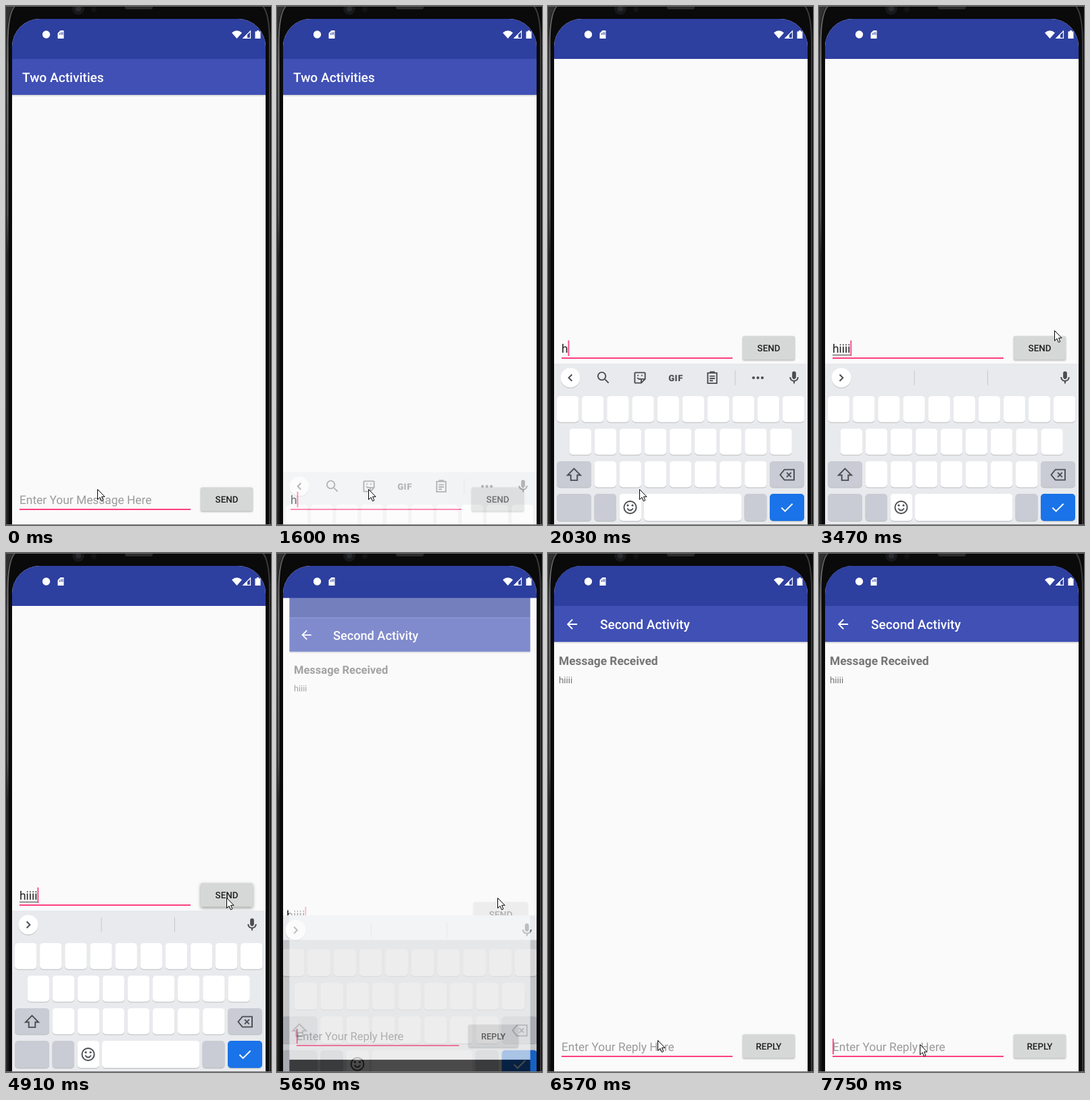
An HTML page for the animation above (8000 ms loop, 392 px wide and 765 px high).

```html
<!DOCTYPE html>
<html lang="en">
<head>
<meta charset="utf-8">
<title>Two Activities</title>
<style>
  html, body { margin: 0; width: 100%; height: 100%; overflow: hidden; background: #0a0a0b; }
  svg { display: block; font-family: Roboto, sans-serif; text-rendering: geometricPrecision; }
  .title { font-size: 19.1px; font-weight: 500; fill: #fff; }
  .field { font-size: 17.35px; fill: #212121; }
  .hint { fill: #9b9b9b; }
  .label { font-size: 13.37px; font-weight: 500; fill: #1f1f1f; text-anchor: middle; }
  .button { fill: #d6d7d7; filter: drop-shadow(0 1px 1px rgba(0,0,0,.32)); }
  .button.raised { filter: drop-shadow(0 2px 2.5px rgba(0,0,0,.38)); }
  .button.rippling { fill: #cbcccc; }
  .bar { fill: #4050b5; }
  .status { fill: #2d3f9f; }
  .paper { fill: #fafafa; }
  .pink { fill: #ff4081; }
  .key { filter: drop-shadow(0 1px 0 rgba(0,0,0,.2)); }
  .line { fill: none; stroke: #4a4d51; stroke-width: 2; }
  .solid { fill: #4a4d51; }
</style>
</head>
<body>
<svg width="392" height="765" viewBox="0 0 392 765">
  <defs>
    <clipPath id="screen"><path d="M9 764V60A41 41 0 0 1 50 19H343A41 41 0 0 1 384 60V764Z"/></clipPath>
    <linearGradient id="edge" x2="0" y2="1">
      <stop stop-color="#555"/><stop offset=".12" stop-color="#8a8a8a"/>
      <stop offset=".4" stop-color="#666"/><stop offset=".48" stop-color="#2c2c2c"/><stop offset="1" stop-color="#242424"/>
    </linearGradient>
  </defs>

  <rect width="392" height="765" fill="#0a0a0b"/>
  <path d="M1 765V55Q1 12 11 0H0V765Z" fill="#303030"/>
  <path d="M2.5 765V56Q2.5 12 13 0" fill="none" stroke="url(#edge)" stroke-width="2"/>
  <path d="M390 765V55Q390 12 380 0" fill="none" stroke="#3a3a3a" stroke-width="2"/>
  <circle cx="107" cy="4" r="9" fill="#17181a"/><circle cx="107" cy="4" r="4" fill="#292b2e"/>
  <circle cx="130" cy="5" r="4" fill="#131314"/>
  <rect x="176" y="-3" width="41" height="8" rx="3" fill="#2a2a2b"/>
  <path d="M0 .5H392" stroke="#6c6c6c"/>

  <g clip-path="url(#screen)">
    <g id="first">
      <rect class="paper" x="9" y="19" width="375" height="760"/>
      <g id="firstContent"></g>
      <rect class="status" x="9" y="0" width="375" height="78"/>
      <g id="keyboard"></g>
    </g>
    <g id="second">
      <rect class="paper" x="9" y="131" width="375" height="633"/>
      <rect class="status" x="9" y="19" width="375" height="59"/>
      <rect x="9" y="764" width="375" height="40"/>
      <g id="secondContent"></g>
    </g>
    <g fill="#fff">
      <circle cx="59.5" cy="42" r="5.7"/>
      <path d="M80.500 36H85.500V48H76.500V40Z"/>
      <path d="M79.500 40v2.500M81.700 38.500v4M83.800 38.500v4" stroke="#2d3f9f"/>
      <path d="M341.500 48L334 39.500Q341.500 33 349 39.500Z"/>
      <path d="M361.500 37V47.400H351Z" fill="none" stroke="#fff" stroke-width="1.200"/>
      <path d="M357 41V48H350Z"/>
      <path d="M368.500 37.500H371V36H374V37.500H376.500V48H368.500Z"/>
    </g>
  </g>
  <path d="M0 764.500H392" stroke="#777"/>
  <path id="mouse" d="M.5 .5V15.500L4 12.300L6.400 17.800L8.800 16.700L6.500 11.300H11Z" fill="#fff" stroke="#000"/>
</svg>

<script>
const $ = id => document.getElementById(id);

const rect = (x, y, w, h, extra = '') => `<rect x="${x}" y="${y}" width="${w}" height="${h}" ${extra}/>`;
const text = (x, y, cls, str, extra = '') => `<text x="${x}" y="${y}" class="${cls}" ${extra}>${str}</text>`;
// Icons are drawn on a 24-unit grid and centred on (cx, cy).
const icon = (cx, cy, d, cls = 'line', extra = '') =>
  `<path transform="translate(${cx} ${cy}) scale(.955) translate(-12 -12)" d="${d}" class="${cls}" ${extra}/>`;

const page = (id, title, titleX, label, hint) =>
  rect(9, 78, 375, 53, 'class="bar"') + rect(9, 131, 375, 2, 'opacity=".12"') +
  text(titleX, 112, 'title', title) +
  text(20, 734, 'field hint', hint, `id="${id}Hint"`) +
  rect(20, 741, 253, 2, 'class="pink"') +
  rect(20, 716, 1.8, 23, `class="pink" id="${id}Caret"`) +
  rect(288, 709.5, 77, 35, `rx="2" class="button" id="${id}Button"`) +
  text(326.5, 732, 'label', label);

$('firstContent').innerHTML = page('first', 'Two Activities', 24, 'SEND', 'Enter Your Message Here') +
  text(20, 734, 'field', '', 'id="typed"') + rect(20, 737, 0, 1, 'id="composing" fill="#444"');

$('secondContent').innerHTML = page('second', 'Second Activity', 77, 'REPLY', 'Enter Your Reply Here') +
  icon(35.5, 105, 'M20 11H7.830l5.590-5.590L12 4l-8 8 8 8 1.410-1.410L7.830 13H20z', '', 'fill="#fff"') +
  text(16, 165.3, '', 'Message Received', 'font-size="17.35" font-weight="700" fill="#757575"') +
  text(16, 192, '', 'hiiii', 'font-size="13.37" fill="#757575"');

function keyboardMarkup() {
  const grey = '#c9ccd4';
  const key = (x, y, w, fill = '#fff') => rect(x, y, w, y > 700 ? 40 : 38.5, `rx="5" fill="${fill}" class="key"`);
  const row = (x, y, count) => Array.from({ length: count }, (_, i) => key(x + i * 37.1, y, 32.5)).join('');
  const divider = x => rect(x, 537, 1, 22, 'fill="#c6c9cd"');
  const dots = [304, 310.5, 317].map(x => `<circle cx="${x}" cy="548" r="2.1" class="solid"/>`).join('');
  const tools =
    icon(33, 548, 'M14.500 7L9.500 12L14.500 17') +
    icon(82, 548, 'M14.500 14.500L20 20M15.500 9.500A6 6 0 1 1 3.500 9.500A6 6 0 1 1 15.500 9.500Z', 'line', 'stroke-width="2.2"') +
    icon(136, 548, 'M5 4H19Q20 4 20 5V14L14 20H5Q4 20 4 19V5Q4 4 5 4ZM14 20V14H20M8 8.500H10M14 8.500H16M8 12Q10 15 13 13.500') +
    text(189, 552.5, 'solid', 'GIF', 'font-size="13" font-weight="900" text-anchor="middle" letter-spacing=".6"') +
    icon(243, 548, 'M5 4.500H19V20.500H5ZM8 9.500H16M8 13H16M8 16.500H13M9 4.500H15V3H9Z') +
    divider(276.5) + dots;
  const suggestions = icon(33, 548, 'M9.500 7L14.500 12L9.500 17') + divider(140.5) + divider(249);

  return rect(0, 527, 392, 260, 'fill="#e8eaed"') +
    '<circle cx="33" cy="548" r="14.5" fill="#fff" class="key"/>' +
    `<g id="tools">${tools}</g><g id="suggestions">${suggestions}</g>` +
    icon(364, 548, 'M12 14c1.660 0 3-1.340 3-3V5a3 3 0 0 0-6 0v6c0 1.660 1.340 3 3 3zm5-3a5 5 0 0 1-10 0H5c0 3.530 2.610 6.430 6 6.920V21h2v-3.080c3.390-.490 6-3.390 6-6.920z', 'solid') +
    row(13, 575, 10) + row(31.5, 623, 9) + row(68.5, 671, 7) +
    key(13, 671, 51, grey) + key(328, 671, 51, grey) +
    key(13, 719, 51, grey) + key(68.5, 719, 32.5, grey) + key(105.5, 719, 32.5) +
    key(142, 719, 144.5) + key(290.5, 719, 33, grey) + key(328, 719, 51, '#1a73e8') +
    icon(38.5, 691, 'M12 2.500L22 12.500H17V20.500H7V12.500H2Z') +
    icon(353.5, 691, 'M8 4H23V20H8L1.500 12ZM11.500 8.500L18.500 15.500M18.500 8.500L11.500 15.500') +
    icon(121.5, 739, 'M21.500 12A9.500 9.500 0 1 1 2.500 12A9.500 9.500 0 1 1 21.500 12ZM7.500 13.500Q12 20 16.500 13.500') +
    '<circle cx="118" cy="736" r="1.6" class="solid"/><circle cx="125" cy="736" r="1.6" class="solid"/>' +
    icon(353.5, 739, 'M3.500 12.500L9 18L20.500 6.500', 'line', 'style="stroke:#fff"') +
    rect(0, 562, 392, 225, 'id="shade"');
}
$('keyboard').innerHTML = keyboardMarkup();

// Each track holds [start time, value]; a value stays until the next one.
const tracks = {
  caret: [[0, 0], [410, 1], [3070, 0], [3470, 1], [4050, 0], [4480, 1], [6570, 0], [6730, 1], [7190, 0], [7600, 1]],
  typed: [[0, ''], [1450, 'h'], [2190, 'hi'], [2340, 'hiii'], [2490, 'hiiii']],
  pan: [[0, 0], [2030, -223], [5650, -198]],
  keyboardAlpha: [[0, 0], [1600, .4], [1730, 1]],
  keyboardDrop: [[0, 240], [1600, 160], [1730, 0], [5650, 3.5]],
  shade: [[0, 0], [5650, .16]],
  suggesting: [[0, 0], [2190, 1]],
  raised: [[0, 0], [4630, 1], [5650, 0]],
  rippling: [[0, 0], [4630, 1], [4910, 0]],
  firstScale: [[0, 1], [5650, 1.034], [5800, 1.08]],
  secondAlpha: [[0, 0], [5650, .65], [5800, 1]],
  secondScale: [[0, .85], [5650, .95], [5800, .985], [5960, .996], [6110, 1]],
  mouse: [[0, [135, 712]], [2930, [158, 690]], [3070, [222, 622]], [3200, [290, 545]], [3340, [334, 494]],
    [3470, [348, 478]], [3900, [337, 498]], [4050, [326, 508]], [6570, [162, 718]], [6730, [153, 731]], [7040, [149, 724]]]
};
const valueAt = (track, t) => track.findLast(([start]) => start <= t)[1];

const set = (id, attrs) => { for (const name in attrs) $(id).setAttribute(name, attrs[name]); };
const zoom = s => `translate(${196.5 * (1 - s)} ${422 * (1 - s)}) scale(${s})`;

function draw(t) {
  const now = {};
  for (const name in tracks) now[name] = valueAt(tracks[name], t);

  $('typed').textContent = now.typed;
  const width = now.typed ? $('typed').getComputedTextLength() : 0;
  set('firstHint', { opacity: now.typed ? 0 : 1 });
  set('composing', { width: now.typed.length > 1 ? width : 0 });
  set('firstCaret', { x: 20 + width, opacity: now.caret });
  set('secondCaret', { opacity: now.caret });
  $('firstButton').classList.toggle('raised', !!now.raised);
  $('firstButton').classList.toggle('rippling', !!now.rippling);

  set('firstContent', { transform: `translate(0 ${now.pan})` });
  set('keyboard', { transform: `translate(0 ${now.keyboardDrop})`, opacity: now.keyboardAlpha });
  set('shade', { opacity: now.shade });
  set('tools', { opacity: 1 - now.suggesting });
  set('suggestions', { opacity: now.suggesting });
  set('first', { transform: zoom(now.firstScale) });
  set('second', { transform: zoom(now.secondScale), opacity: now.secondAlpha });
  set('mouse', { transform: `translate(${now.mouse})` });
}

const begin = performance.now();
function tick() {
  draw((performance.now() - begin) % 8000);
  requestAnimationFrame(tick);
}
tick();
</script>
</body>
</html>
```
